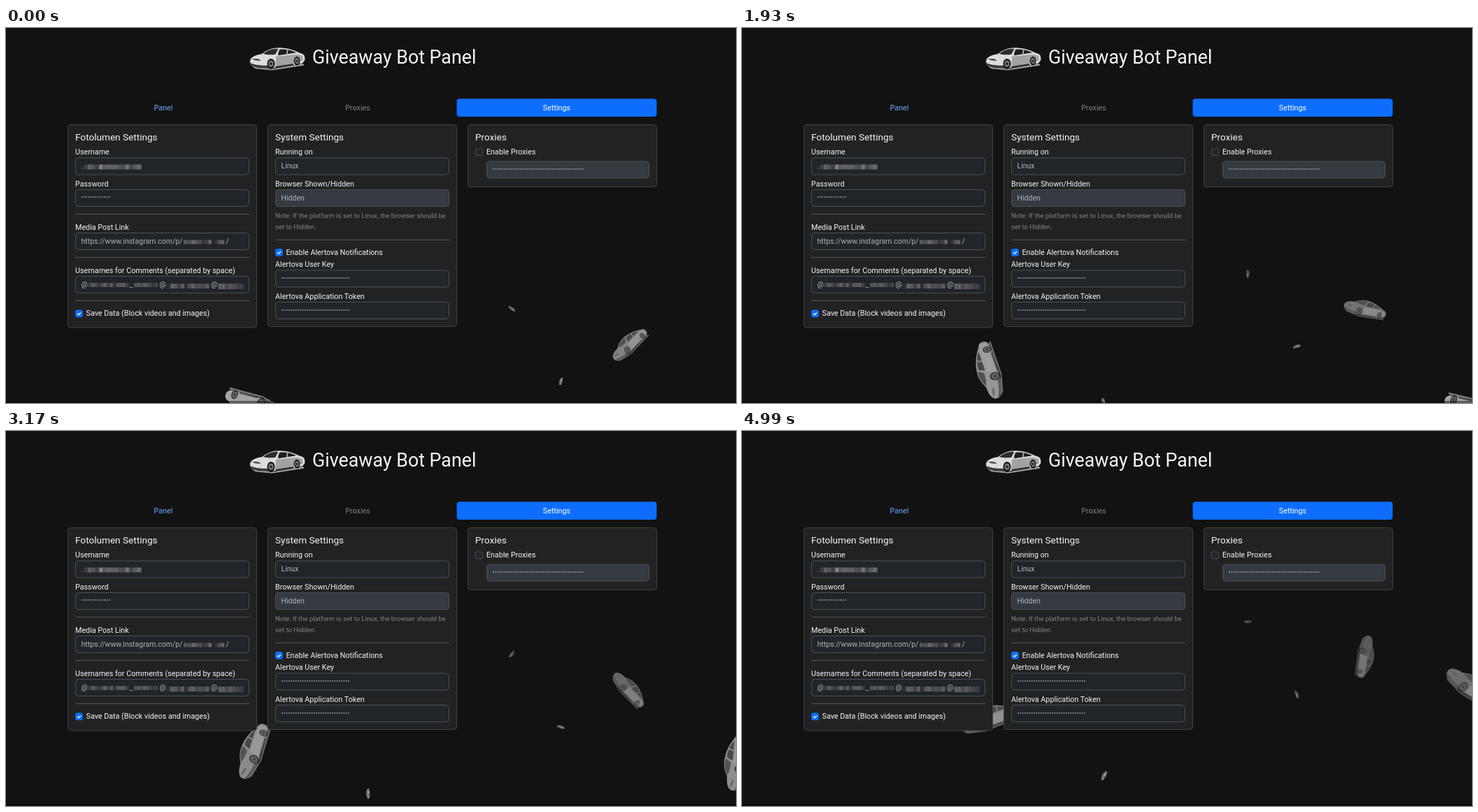
Write an HTML page with a canvas that moves like this. It is 1044 by 537 pixels and loops after 5060 ms.

```html
<!DOCTYPE html>
<html lang="en">
<head>
<meta charset="utf-8">
<title>Giveaway Bot Panel</title>
<style>
  html, body { margin: 0; width: 100%; height: 100%; overflow: hidden; background: #121212; }
  canvas, svg { position: absolute; left: 0; top: 0; width: 1044px; height: 537px; display: block; }
  text { font-family: Roboto, "Open Sans", sans-serif; font-size: 10.75px; fill: #f4f5f6; white-space: pre; }
  .head { font-size: 13.6px; }
  .title { font-size: 26.8px; }
  .value { font-size: 10.5px; fill: #adb5bd; }
  .hint { font-size: 9.5px; fill: #7f8488; }
  .tab { text-anchor: middle; }
  .link { fill: #6ea8fe; }
  .off { fill: #7d8186; }
  .active { fill: #fff; }
</style>
</head>
<body>
<canvas id="cars" width="1044" height="537"></canvas>
<svg id="panel" viewBox="0 0 1044 537"></svg>
<script>
const LOOP = 5060, STEP = 69.2, LAST = 72;
const ctx = document.getElementById('cars').getContext('2d');
const parts = [];

// ---- Static panel ----
const rect = (x, y, w, h, fill, stroke = 'none', r = 4) => parts.push(
  `<rect x="${x}" y="${y}" width="${w}" height="${h}" rx="${r}" fill="${fill}" stroke="${stroke}"/>`);
const text = (str, x, y, cls = 'label') => parts.push(`<text x="${x}" y="${y}" class="${cls}">${str}</text>`);
const card = (x, h) => rect(x + .5, 138.5, 270, h, '#222', '#414141');
const field = (x, y, w = 248, off = false) =>
  rect(x + .5, y + .5, w, 24, off ? '#343a40' : '#212529', '#495057');
const rule = (x, y) => rect(x, y, 249, 1, '#565656', 'none', 0);

function check(x, y, on) {
  rect(x + .5, y + .5, 9.8, 9.8, on ? '#0d6efd' : '#212529', on ? '#0d6efd' : '#495057', 2.2);
  if (on) parts.push(`<path d="M${x + 3} ${y + 5.6}l1.7 1.7l3.2 -3.3" fill="none" stroke="#fff" stroke-width="1.3"/>`);
}

function dots(x, y, n) {
  for (let i = 0; i < n; i++) {
    parts.push(`<circle cx="${(x + 1.6 + i * 3.27).toFixed(2)}" cy="${y}" r=".9" fill="#9ba2a9"/>`);
  }
}

let seed = 11;
const rnd = () => (seed = seed * 16807 % 2147483647) / 2147483647;

// Mosaic that hides a private value
function mosaic(x, y, w, h, cell, low, high) {
  for (let i = 0; i < w; i += cell) {
    const v = Math.round(low + rnd() * (high - low));
    rect(x + i, y, Math.min(cell, w - i), h, `rgb(${v},${v + 2},${v + 7})`, 'none', 0);
  }
}

rect(0, 534, 1044, 3, 'rgba(12,5,7,.45)', 'none', 0);
text('Giveaway Bot Panel', 438, 51, 'title');
text('Panel', 225, 118, 'tab link');
text('Proxies', 503, 118, 'tab off');
rect(644.6, 101.2, 285.9, 25.8, '#0d6efd');
text('Settings', 787.5, 118, 'tab active');

card(88, 290.5);
text('Fotolumen Settings', 99, 160.5, 'head');
text('Username', 99, 181);
field(99, 185.5);
rect(108, 200, 1, 2, '#777d83', 'none', 0);
mosaic(111.5, 195.5, 82, 7, 5.4, 60, 135);
text('Password', 99, 226.5);
field(99, 231);
dots(107, 242, 13);
rule(99, 266);
text('Media Post Link', 99, 289);
field(99, 293);
text('https://www.instagram.com/p/', 107.5, 309, 'value');
mosaic(254, 303.5, 17, 6, 4, 70, 115);
mosaic(271, 303.5, 43, 6, 4.6, 36, 120);
text('/', 314.5, 309, 'value');
rule(99, 328);
text('Usernames for Comments (separated by space)', 99, 351);
field(99, 355);
text('@', 107.5, 371, 'value');
mosaic(118, 365, 58, 6, 4.4, 50, 95);
text('_', 176.5, 371, 'value');
mosaic(183, 365, 34, 6, 4.4, 45, 90);
text('@', 219.5, 371, 'value');
mosaic(230, 366, 61, 7, 5, 45, 95);
text('@', 293, 371, 'value');
mosaic(303.5, 366, 36.5, 8, 5, 58, 95);
rule(99, 390);
check(99, 403.5, true);
text('Save Data (Block videos and images)', 114.5, 412);

card(374, 289);
text('System Settings', 385, 160.5, 'head');
text('Running on', 385, 181);
field(385, 185.5);
text('Linux', 393.5, 201, 'value');
text('Browser Shown/Hidden', 385, 226.5);
field(385, 231, 248, true);
text('Hidden', 393.5, 247, 'value');
text('Note: If the platform is set to Linux, the browser should be', 385, 272, 'hint');
text('set to Hidden.', 385, 288, 'hint');
rule(385, 303);
check(385, 316, true);
text('Enable Alertova Notifications', 400.5, 325);
text('Alertova User Key', 385, 342);
field(385, 346.5);
dots(393.5, 358, 30);
text('Alertova Application Token', 385, 388);
field(385, 392);
dots(393.5, 404, 30);

card(660, 89);
text('Proxies', 671, 160.5, 'head');
check(671, 172.5, false);
text('Enable Proxies', 687, 181);
field(687, 190.5, 232, true);
dots(695.5, 202, 40);

document.getElementById('panel').innerHTML = parts.join('');

// ---- Cars: plain sedan, 100 units long, nose to the left ----
const shape = (d, color) => [new Path2D(d), color];
const sedan = [
  shape('M-47 13L-12 19L46 9L48 12L-10 21L-40 18Z', '#a4a4a4'),
  shape('M-50 4C-49-3-41-7-28-9C-19-16-10-20 3-20C19-20 31-15 41-10C48-9 50-4 49 3L45 8L28 12L-10 17C-28 18-45 16-49 10Z', '#dcdcda'),
  shape('M-49 8C-40 12-24 13-17 12L-16 17C-30 18-45 16-49 10Z', '#3a3a3a'),
  shape('M-26-9C-17-16-9-19 1-18L-4-8C-11-7-20-7-26-9Z', '#2b2d2f'),
  shape('M4-17C17-18 27-15 34-11L1-6C0-9 2-14 4-17Z', '#1c1e20'),
  shape('M-3-4L36-8L45-5L46 3L28 9L-4 14Z', '#a2a2a1'),
  shape('M-4 14L28 9L30 12L-4 17Z', '#2e2e2e'),
  shape('M17-17L19-17L18-8L16-8Z', '#b8b8b8'),
  shape('M-47 0L-35 0L-30 4L-41 3Z', '#4a4c4e')
];

function wheel(x, y, rx, ry) {
  [[1, '#151515'], [.64, '#7c7c7c'], [.3, '#242424']].forEach(([k, color]) => {
    ctx.fillStyle = color;
    ctx.beginPath();
    ctx.ellipse(x, y, rx * k, ry * k, 0, 0, Math.PI * 2);
    ctx.fill();
  });
}

function car(x, y, length, angle, alpha) {
  ctx.save();
  ctx.translate(x, y);
  ctx.rotate(angle * Math.PI / 180);
  ctx.scale(length / 100, length / 100);
  ctx.globalAlpha = alpha;
  for (const [path, color] of sedan) {
    ctx.fillStyle = color;
    ctx.fill(path);
  }
  wheel(-12, 9, 7, 9);
  wheel(35, 4, 5.5, 8);
  ctx.restore();
}

// x, y and angle at time zero, length, seconds for the full rise, progress at time zero
const floaters = [
  [352.5, 540, -156, 84, 25, .272],
  [891.5, 452.5, -38, 62, 25, .444],
  [1044, 660, -285, 84, 11, .095],
  [390, 353, 84, 33.5, 18, .64],
  [723.5, 402, 40, 11.5, 25, .556],
  [793.5, 506, -70, 11.5, 25, .403],
  [517.8, 565, -138, 14.5, 45, .308]
];
const RISE = 646, TURN = 720;

function draw(now) {
  const frame = Math.min(LAST, Math.floor((now % LOOP + 16) / STEP));
  const t = frame * STEP / 1000;
  ctx.fillStyle = '#121212';
  ctx.fillRect(0, 0, 1044, 537);
  car(388.5, 44, 79, 0, 1);
  for (const [x, y, angle, length, span, start] of floaters) {
    const p = t / span;
    car(x, y - RISE * p, length, angle + TURN * p, 1 - start - p);
  }
}

const begin = performance.now();
function tick() {
  draw(performance.now() - begin);
  requestAnimationFrame(tick);
}
tick();
</script>
</body>
</html>
```
